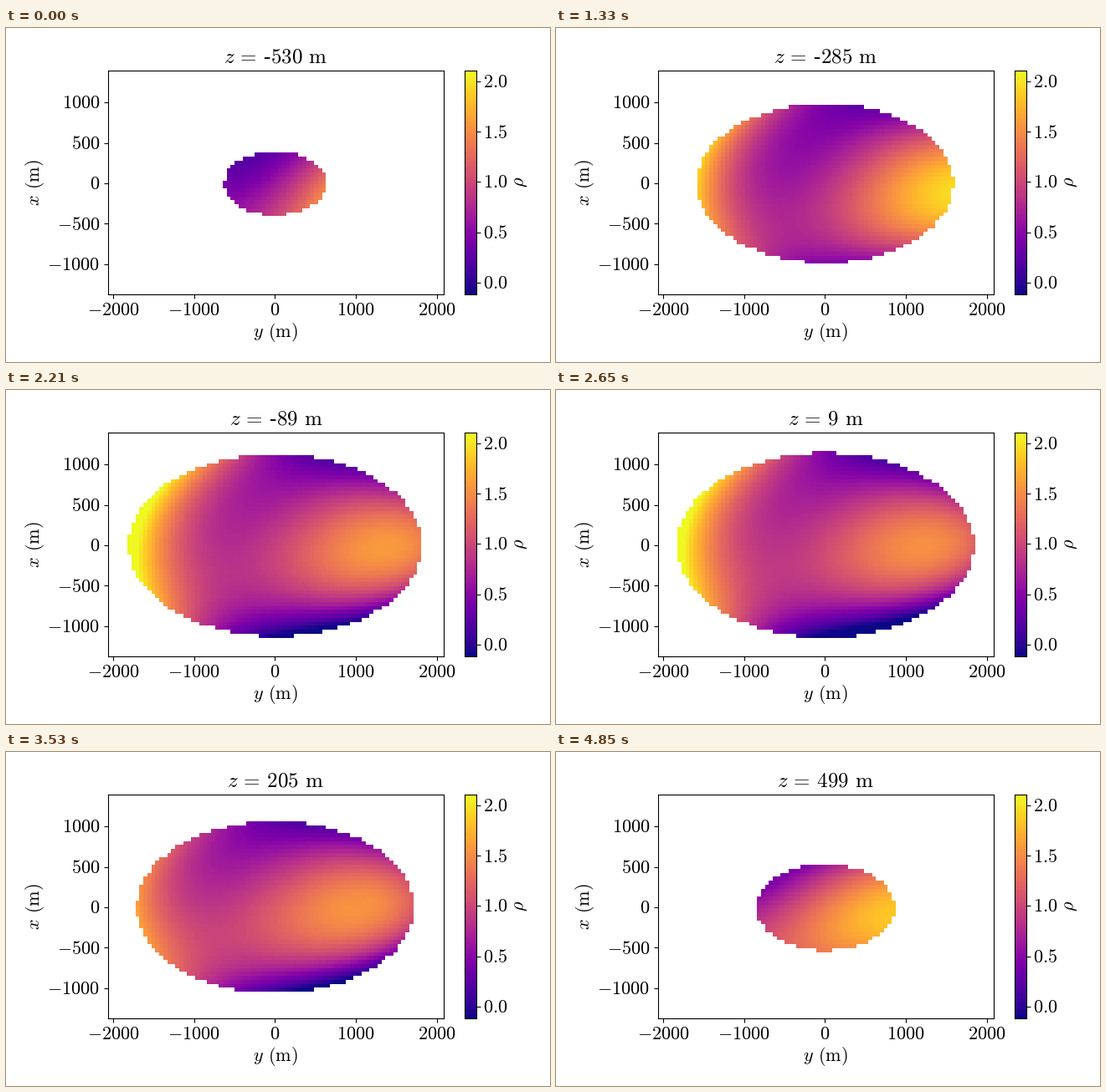
These frames come from a looping animation (650x400 px, 5.07 s). A matplotlib script:

```python
import numpy as np
import matplotlib.pyplot as plt
from matplotlib.animation import FuncAnimation

plt.rcParams.update({"mathtext.fontset": "cm", "font.family": "Liberation Serif"})

W, H = 650, 400
SCALE = 0.0967                     # pixels per metre
Y0, X0 = 321.4, 185.9              # pixel position of y = 0 and x = 0
CELL = 49
SEMI_Y, SEMI_X, SEMI_Z = 1835.5, 1140.5, 564.4
RHO_MIN, RHO_MAX = -0.115, 2.105
FIRST_Z = -530
FIRST_MS, STEP_MS, SLICES, TICK_MS = 450, 220, 22, 30
LOOP_MS = FIRST_MS + STEP_MS * (SLICES - 1)

ys = 12.5 + CELL * np.arange(-40, 41)
xs = 9.6 + CELL * np.arange(-26, 27)
GRID_Y, GRID_X = np.meshgrid(ys, xs)


def density(y, x, z):
    """Cubic density field; coordinates in metres."""
    y, x, z = y / 1000, x / 1000, z / 500
    along_y = (1.01 + 0.35 * z + y * (0.5 + 0.35 * z**2)
               + y**2 * (0.23 - 0.37 * z) - 0.24 * y**3)
    along_x = (x * (-0.27 + 0.15 * y**2 + 0.42 * y * z - 0.58 * z**2)
               - x**2 * (0.7 + y + 0.55 * z) + 0.45 * x**3)
    return along_y + along_x


def density_slice(z):
    inside = (GRID_Y / SEMI_Y)**2 + (GRID_X / SEMI_X)**2 + (z / SEMI_Z)**2 < 1
    return np.where(inside, density(GRID_Y, GRID_X, z), np.nan)


def title_text(z):
    sign = "$-$" if z < 0 else ""
    return (r"$z\hspace{0.18}=\hspace{0.18}" + sign + str(abs(z))
            + r"\hspace{0.38}\mathrm{m}$")


def pixel_axes(left, top, right, bottom):
    return fig.add_axes([left / W, 1 - bottom / H, (right - left) / W, (bottom - top) / H])


def label(x, y, text, rotation=0):
    fig.text(x / W, 1 - y / H, text, size=16, ha="center", va="baseline",
             rotation=rotation, rotation_mode="anchor")


fig = plt.figure(figsize=(W / 100, H / 100), dpi=100, facecolor="white")

left, top, right, bottom = 122, 51, 523, 319
ax = pixel_axes(left, top, right, bottom)
half = CELL / 2
image = ax.imshow(density_slice(FIRST_Z), cmap="plasma", vmin=RHO_MIN, vmax=RHO_MAX,
                  origin="lower", interpolation="nearest", aspect="auto",
                  extent=[ys[0] - half, ys[-1] + half, xs[0] - half, xs[-1] + half])
ax.set_xlim((left - Y0) / SCALE, (right - Y0) / SCALE)
ax.set_ylim((X0 - bottom) / SCALE, (X0 - top) / SCALE)
y_ticks, x_ticks = range(-2000, 2001, 1000), range(-1000, 1001, 500)
ax.set_xticks(y_ticks, [f"${t}$" for t in y_ticks], size=16)
ax.set_yticks(x_ticks, [f"${t}$" for t in x_ticks], size=16)
ax.tick_params(axis="x", pad=4.2)
title = ax.set_title(title_text(FIRST_Z), size=18, pad=6.7)

bar = pixel_axes(548, top, 562, bottom)
bar.imshow(np.linspace(0, 1, 256)[:, None], cmap="plasma", origin="lower",
           aspect="auto", extent=[0, 1, RHO_MIN, RHO_MAX])
bar.set_xticks([])
bar.yaxis.tick_right()
rho_ticks = np.arange(0, 2.1, 0.5)
bar.set_yticks(rho_ticks, [f"${t:.1f}$" for t in rho_ticks], size=16)
bar.tick_params(axis="y", pad=2)

label(322, 369.5, r"$y\hspace{0.38}\mathrm{(m)}$")
label(40.5, 185.5, r"$x\hspace{0.38}\mathrm{(m)}$", 90)
label(618.5, 184.5, r"$\rho$", 90)


def update(frame):
    t = frame * TICK_MS + TICK_MS - 1
    index = 0 if t < FIRST_MS else 1 + (t - FIRST_MS) // STEP_MS
    z = FIRST_Z + CELL * index
    image.set_data(density_slice(z))
    title.set_text(title_text(z))
    return image, title


anim = FuncAnimation(fig, update, frames=LOOP_MS // TICK_MS, interval=TICK_MS,
                     repeat=True, repeat_delay=0)
plt.show()
```
